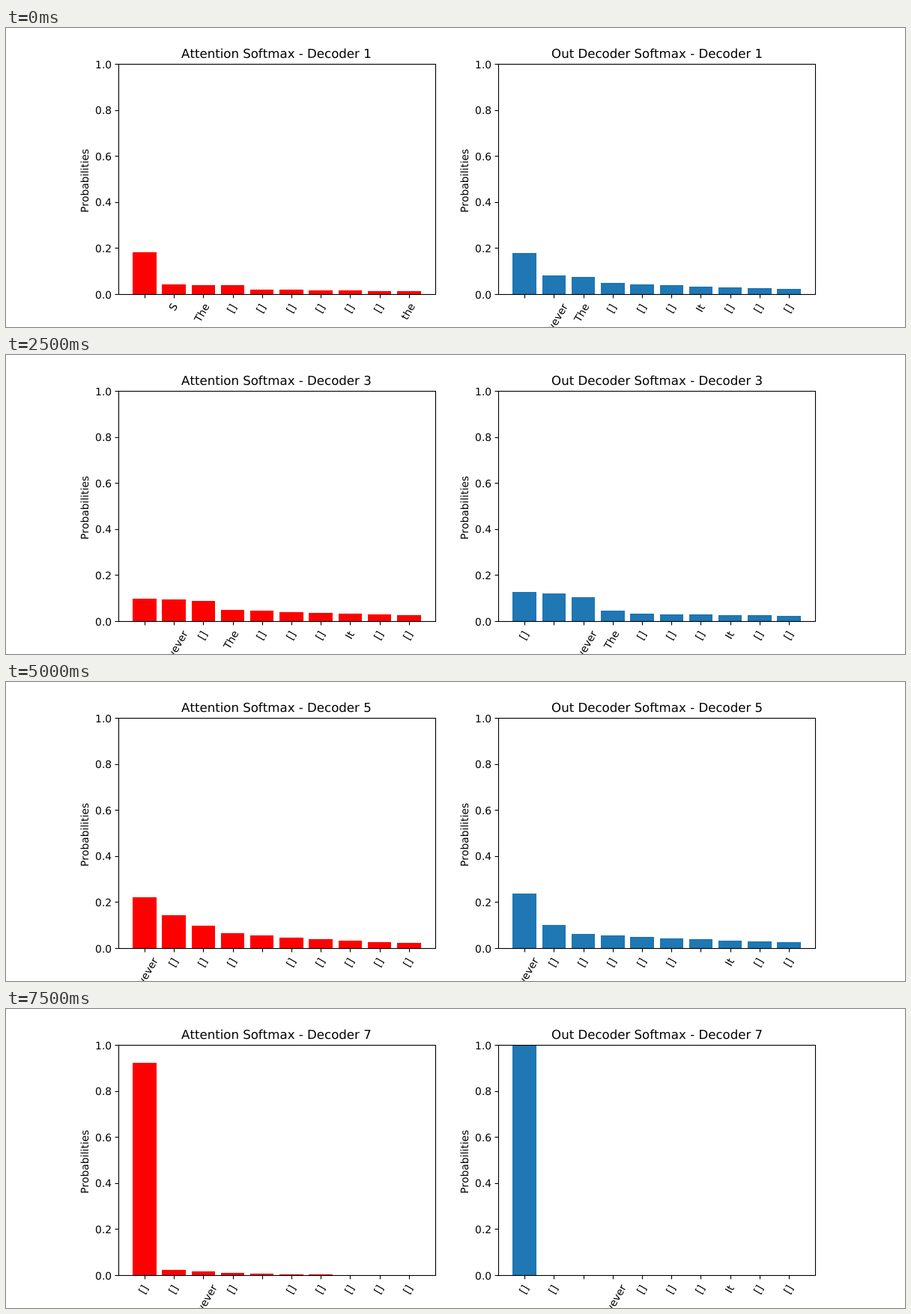
Write an HTML page with a canvas that moves like this. It is 1200 px wide and 400 px high and loops after 8000 ms.

```html
<!DOCTYPE html>
<html lang="en">
<head>
<meta charset="utf-8">
<title>Decoder softmax</title>
<style>
html, body { margin: 0; width: 100%; height: 100%; overflow: hidden; background: #fff; }
canvas { display: block; }
</style>
</head>
<body>
<canvas id="stage" width="1200" height="400"></canvas>
<script>
const ctx = document.getElementById('stage').getContext('2d');

const LOOP = 8000, STEP = 1250;
const PT = 100 / 72;
const TOP = 48, BOTTOM = 356, WIDTH = 930 / 2.2;
const BARS = 10, UNIT = WIDTH / 10.78;   // one bar slot
const PAD = 7 * PT;                      // tick length plus label gap
const ASCENT = 11, DESCENT = 3;          // line box of the 10 pt font

const WORDS = {
  '#': '[]', _: '', H: 'However', T: 'The', t: 'the', I: 'It', A: 'As', S: 'S'
};

// Each decoder gives its leading bar heights, the height of its last bar
// and one letter per tick label.
const step = (labels, last, ...head) => ({ labels, last, head });

const charts = [
  {
    title: 'Attention Softmax', left: 150, color: '#ff0000',
    steps: [
      step('_ST######t', 4, 56, 13, 12, 12, 6),
      step('_HT##I##A#', 7, 40, 25),
      step('_H#T###I##', 8, 30, 29, 27, 15),
      step('#H_###IT##', 7, 55, 35, 29, 12),
      step('H###_#####', 7, 68, 44, 30, 20),
      step('H######I#_', 5, 86, 43, 24),
      step('##H#_#####', 0.15, 284, 7, 5)
    ]
  },
  {
    title: 'Out Decoder Softmax', left: 1080 - WIDTH, color: '#1f77b4',
    steps: [
      step('_HT###I###', 7, 55, 25, 23, 15),
      step('H_T###I###', 7, 33, 29, 18),
      step('#_HT###I##', 7, 39, 37, 32, 14, 10),
      step('H##_####I#', 7, 71, 20),
      step('H#####_I##', 8, 73, 31, 19),
      step('H########_', 4, 95, 35, 28, 24, 22, 19),
      step('##_H###I##', 0.1, 308, 0.1)
    ]
  }
];

// Past the leading bars the heights decay geometrically to the last one.
function barHeight({ head, last }, i) {
  const n = head.length - 1;
  if (i <= n) return Math.round(head[i]);
  return Math.round(head[n] * (last / head[n]) ** ((i - n) / (BARS - 1 - n)));
}

const snap = v => Math.round(v) + 0.5;

// Font sizes and advances are multiples of an eighth of a pixel.
const eighth = v => Math.round(v * 8) / 8;
const sizeOf = points => eighth(points * PT);

// Text measures per pixel of font size, taken large to avoid rounding.
function measure(str) {
  ctx.font = '1000px "DejaVu Sans", sans-serif';
  const m = ctx.measureText(str);
  return {
    advance: m.width / 1000,
    bearing: -m.actualBoundingBoxLeft / 1000,
    descent: m.actualBoundingBoxDescent / 1000
  };
}

function widthOf(str, size) {
  return [...str].reduce((w, c) => w + eighth(measure(c).advance * size), 0);
}

// Baseline starts at (x, y); the ink corner moves to a whole pixel.
function drawText(str, size, x, y, degrees = 0) {
  const m = measure(str);
  const bearing = m.bearing * size;
  const drop = Math.max(0, Math.round(m.descent * size));
  const a = degrees * Math.PI / 180, sin = Math.sin(a), cos = Math.cos(a);
  ctx.save();
  ctx.translate(Math.round(x + bearing + drop * sin) - sin,
                Math.round(y + drop * cos) + 1 - cos);
  ctx.rotate(-a);
  let pen = -Math.trunc(bearing);
  for (const c of str) {
    const advance = widthOf(c, size);
    ctx.font = `${size}px "DejaVu Sans", sans-serif`;
    ctx.fillText(c, pen, -drop);
    pen += advance;
  }
  ctx.restore();
}

function line(x1, y1, x2, y2) {
  ctx.beginPath();
  ctx.moveTo(x1, y1);
  ctx.lineTo(x2, y2);
  ctx.stroke();
}

// Label turned by 60 degrees, its bounding box centred below the tick.
function slantedLabel(str, size, x) {
  const sin = Math.sin(Math.PI / 3), cos = 0.5;
  const w = widthOf(str, size), h = ASCENT + DESCENT;
  const boxLeft = x - (w * cos + h * sin) / 2;
  const boxBottom = BOTTOM + PAD + w * sin + h * cos;
  drawText(str, size, boxLeft + ASCENT * sin, boxBottom - DESCENT * cos, 60);
}

function drawBars({ left, color, steps }, index) {
  ctx.fillStyle = color;
  for (let i = 0; i < BARS; i++) {
    const x1 = Math.round(left + (0.49 + i) * UNIT);
    const x2 = Math.round(left + (1.29 + i) * UNIT);
    const h = barHeight(steps[index], i);
    ctx.fillRect(x1, BOTTOM - h, x2 - x1, h);
  }
}

function drawAxes({ left, title, steps }, index) {
  const x0 = snap(left), y0 = snap(BOTTOM);
  const small = sizeOf(10), large = sizeOf(12);
  ctx.fillStyle = ctx.strokeStyle = '#000';
  ctx.lineWidth = 0.8 * PT;
  ctx.strokeRect(x0, snap(TOP), snap(left + WIDTH) - x0, y0 - snap(TOP));

  const labelLeft = left - PAD - widthOf('0.0', small);
  for (let k = 0; k <= 5; k++) {
    const y = BOTTOM - (BOTTOM - TOP) * k / 5;
    line(x0 - 5, snap(y), x0, snap(y));
    drawText((k / 5).toFixed(1), small, labelLeft, y + ASCENT / 2);
  }

  [...steps[index].labels].forEach((key, i) => {
    const x = left + (0.89 + i) * UNIT;
    line(snap(x), y0, snap(x), y0 + 5);
    if (WORDS[key]) slantedLabel(WORDS[key], small, x);
  });

  const name = 'Probabilities';
  drawText(name, small, labelLeft - 4 * PT - DESCENT,
           (TOP + BOTTOM + widthOf(name, small)) / 2, 90);

  const heading = `${title} - Decoder ${index + 1}`;
  drawText(heading, large, left + (WIDTH - widthOf(heading, large)) / 2, TOP - 6 * PT);
}

function render(index) {
  ctx.fillStyle = '#fff';
  ctx.fillRect(0, 0, 1200, 400);
  for (const chart of charts) {
    drawBars(chart, index);
    drawAxes(chart, index);
  }
}

ctx.textRendering = 'geometricPrecision';
let start, shown = 0;
function tick(now) {
  start ??= now;
  const index = Math.floor((now - start) % LOOP / STEP);
  if (index !== shown) render(shown = index);
  requestAnimationFrame(tick);
}
render(shown);
requestAnimationFrame(tick);
</script>
</body>
</html>
```
